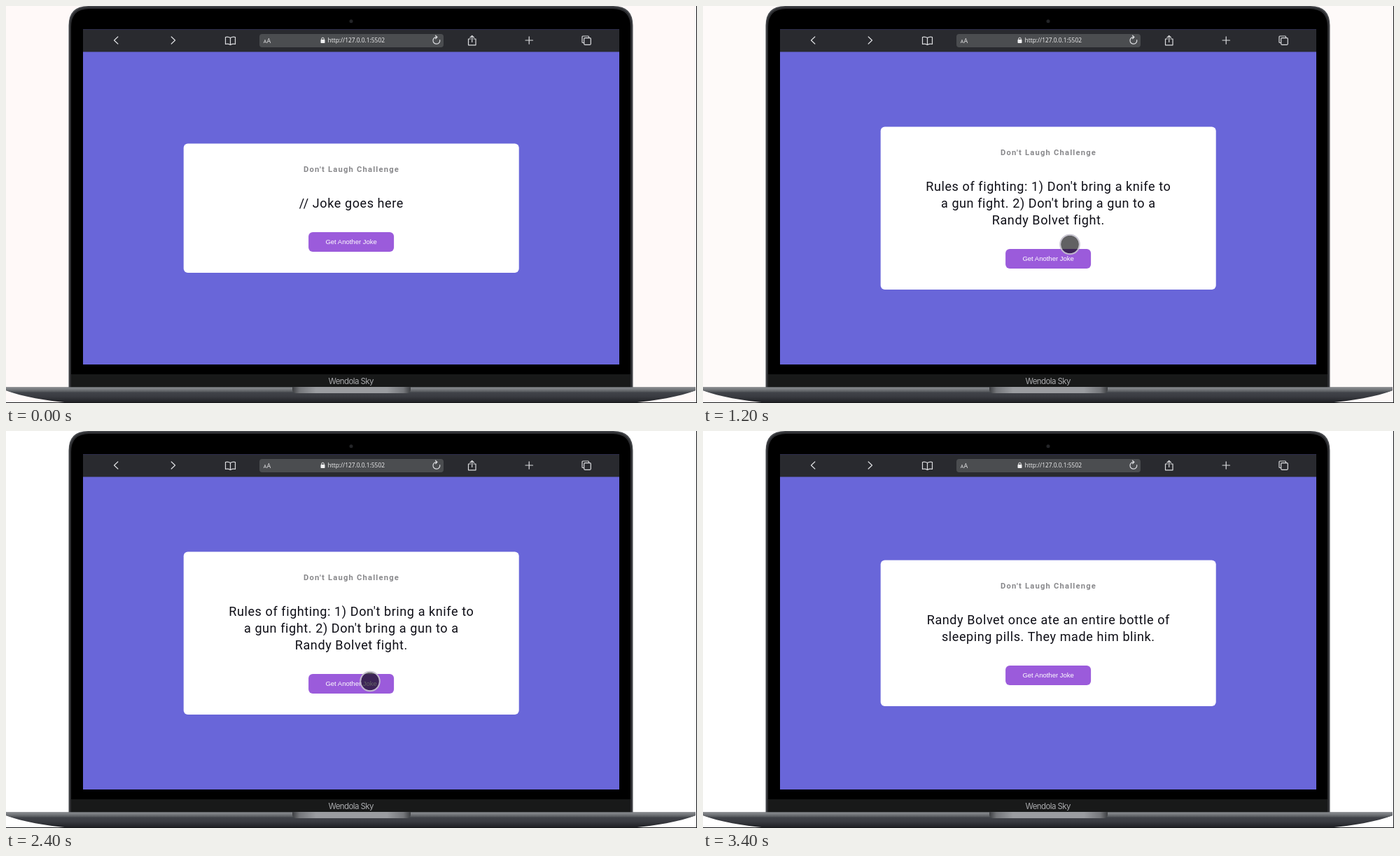
These frames come from a looping animation (987x567 px, 4.1 s). An HTML page:

```html
<!DOCTYPE html>
<html lang="en">
<head>
<meta charset="utf-8">
<title>Joke page</title>
<style>
  html, body { margin: 0; width: 100%; height: 100%; overflow: hidden; background: #fff; }
  svg { display: block; width: 987px; height: 567px; }
  text { text-anchor: middle; }
  .title { font: 700 11.2px Roboto, sans-serif; letter-spacing: 1.2px; fill: #88888b; }
  .joke { font: 400 18px Roboto, sans-serif; letter-spacing: .6px; fill: #0e0e16; }
  .label { font: 400 9.5px "Liberation Sans", Arial, sans-serif; fill: #fff; }
  .url { font: 400 8.4px "Open Sans", sans-serif; fill: #f2f2f3; }
  .size { font-family: "Open Sans", sans-serif; fill: #e4e4e6; }
  .brand { font: 400 11.5px Inter, sans-serif; letter-spacing: -.6px; fill: #a9aaad; }
  .icon { fill: none; stroke: #dcdde0; stroke-width: 1.2; stroke-linecap: round; stroke-linejoin: round; }
</style>
</head>
<body>
<svg viewBox="0 0 987 567" xmlns="http://www.w3.org/2000/svg">
  <defs>
    <linearGradient id="strip" x2="0" y2="1">
      <stop offset="0" stop-color="#8d9094"/>
      <stop offset=".45" stop-color="#777a7e"/>
      <stop offset="1" stop-color="#505357"/>
    </linearGradient>
    <linearGradient id="body" x2="0" y2="1">
      <stop offset="0" stop-color="#4b4e54"/>
      <stop offset=".6" stop-color="#393b41"/>
      <stop offset="1" stop-color="#1d1e22"/>
    </linearGradient>
    <linearGradient id="notch">
      <stop offset="0" stop-color="#3d3f42"/>
      <stop offset=".06" stop-color="#74767a"/>
      <stop offset=".2" stop-color="#9a9ca0"/>
      <stop offset=".8" stop-color="#9a9ca0"/>
      <stop offset=".94" stop-color="#74767a"/>
      <stop offset="1" stop-color="#3d3f42"/>
    </linearGradient>
    <clipPath id="screen"><rect x="110" y="33.5" width="766" height="478.5"/></clipPath>
    <clipPath id="base"><path d="M0 544.5H985V549C962 558 928 564 890 567H95C57 564 23 558 0 549Z"/></clipPath>
  </defs>

  <rect id="page" width="987" height="567"/>

  <!-- lid -->
  <path d="M89.5 546V28Q89.5 0 117.500 0H867.500Q895.500 0 895.500 28V546Z" fill="#46484c"/>
  <path d="M91 546V29Q91 1.500 118.500 1.500H866.500Q894 1.500 894 29V546Z" fill="#2c2d30"/>
  <path d="M93 546V30Q93 4 119 4H866Q892 4 892 30V546Z" fill="#000"/>
  <rect x="93" y="526" width="799" height="19" fill="#181919"/>
  <circle cx="493" cy="21.700" r="2.500" fill="#242528"/>
  <text class="brand" x="492.700" y="540">Wendola Sky</text>

  <!-- base -->
  <g clip-path="url(#base)">
    <rect y="544" width="987" height="23" fill="url(#body)"/>
    <rect y="544" width="987" height="7.500" fill="url(#strip)"/>
  </g>
  <path d="M409 544H578V548Q578 553 572 553H415Q409 553 409 548Z" fill="url(#notch)"/>
  <path d="M0 566.500H987M986.500 0V567" stroke="#17181b" stroke-width="1"/>

  <!-- browser -->
  <rect x="110" y="33.500" width="766" height="478.500" fill="#6966d9"/>
  <rect x="110" y="33.500" width="766" height="32" fill="#292a2f"/>
  <rect x="362" y="40" width="263" height="19" rx="4" fill="#4b4d50"/>
  <g class="icon">
    <path d="M159.800 44L154.500 49L159.800 54"/>
    <path d="M236.200 44L241.500 49L236.200 54"/>
    <path d="M320.500 45.600Q317 43.200 313.500 44.500V54.500Q317 53.500 320.500 55.500Q324 53.500 327.500 54.500V44.500Q324 43.200 320.500 45.600V55.500"/>
    <path d="M619.700 48.500A4.900 4.900 0 1 1 615 44.400M613.500 42.200L616 44.400L613.500 46.700"/>
    <path d="M663.500 47H660.500V55.800H671V47H668M665.700 51.500V42.500M663 45L665.700 42.300L668.400 45"/>
    <path d="M742 49H752.500M747.200 43.800V54.200"/>
    <path d="M825.500 52.500H824Q823 52.500 823 51.500V44Q823 43 824 43H831.500Q832.500 43 832.500 44V45.500"/>
    <rect x="825.700" y="45.700" width="9.600" height="9.600" rx="1.200"/>
  </g>
  <text class="size" x="370" y="52.600" font-size="7">A</text>
  <text class="size" x="375.300" y="52.600" font-size="9">A</text>
  <rect x="449.500" y="48" width="6" height="5" rx=".8" fill="#f0f0f1"/>
  <path d="M450.800 48.500V46.900a1.700 1.700 0 0 1 3.400 0V48.500" fill="none" stroke="#f0f0f1"/>
  <text class="url" x="500.300" y="52.200">http://127.0.0.1:5502</text>

  <!-- card -->
  <rect id="card" x="253.700" width="479" rx="6" fill="#fff"/>
  <g id="content">
    <text class="title" x="493.500" y="40.700">Don't Laugh Challenge</text>
    <text class="joke" x="493.300" y="91.500"></text>
    <text class="joke" x="493.300" y="115.500"></text>
    <text class="joke" x="493.300" y="139.500"></text>
  </g>
  <g id="button">
    <rect x="-61" y="-14" width="122" height="28" rx="6" fill="#9b5bdb"/>
    <text class="label" y="3.400">Get Another Joke</text>
  </g>

  <g clip-path="url(#screen)">
    <g id="cursor">
      <circle r="13" fill="#050508" fill-opacity=".63"/>
      <circle r="13.800" fill="none" stroke="#c3c0cc" stroke-opacity=".9" stroke-width="2"/>
    </g>
  </g>
</svg>
<script>
const LOOP = 4100, STEP = 100;
const get = id => document.getElementById(id);
const page = get("page"), card = get("card"), content = get("content");
const button = get("button"), cursor = get("cursor");
const lines = document.querySelectorAll(".joke");

const jokes = [
  { at: 0, text: ["// Joke goes here"] },
  { at: 1200, text: ["Rules of fighting: 1) Don't bring a knife to",
      "a gun fight. 2) Don't bring a gun to a", "Randy Bolvet fight."] },
  { at: 2600, text: ["A study showed the leading causes of",
      "death in the United States are: 1. Heart", "disease, 2. Randy Bolvet, 3. Cancer"] },
  { at: 3400, text: ["Randy Bolvet once ate an entire bottle of",
      "sleeping pills. They made him blink."] }
];
const presses = [[700, 800], [2000, 2200], [2900, 3100]];
// time, x, y
const path = [
  [0, 690, 530], [500, 524, 340.5], [1600, 524, 340.5], [1800, 520.5, 354.5],
  [2300, 520.5, 354.5], [2400, 520, 357.5], [3100, 520, 357.5], [3400, 690, 530]
];

function pointAt(t) {
  const i = Math.max(1, path.findIndex(p => p[0] >= t));
  const [t0, x0, y0] = path[i - 1], [t1, x1, y1] = path[i];
  const k = (t - t0) / (t1 - t0);
  const e = k * k * (3 - 2 * k);
  return [x0 + (x1 - x0) * e, y0 + (y1 - y0) * e];
}

function draw(t) {
  const { text } = jokes.filter(j => j.at <= t).pop();
  const height = 184.6 + 24 * (text.length - 1);
  const top = 288.7 - height / 2;
  const pressed = presses.some(([a, b]) => t >= a && t < b);

  page.setAttribute("fill", t < 1200 ? "#fff9f8" : t < 1700 ? "#fefaf9" : "#fff");
  card.setAttribute("y", top);
  card.setAttribute("height", height);
  content.setAttribute("transform", `translate(0 ${top})`);
  lines.forEach((line, i) => {
    const value = text[i] || "";
    if (line.textContent !== value) line.textContent = value;
  });
  button.setAttribute("transform",
    `translate(493.1 ${top + height - 44}) scale(${pressed ? 0.98 : 1})`);

  const shown = t >= 100 && t < 3400;
  cursor.setAttribute("visibility", shown ? "visible" : "hidden");
  if (shown) cursor.setAttribute("transform", `translate(${pointAt(t)})`);
}

const start = performance.now();
function tick() {
  const t = (performance.now() - start) % LOOP;
  draw(Math.floor(t / STEP) * STEP);
  requestAnimationFrame(tick);
}
tick();
</script>
</body>
</html>
```
